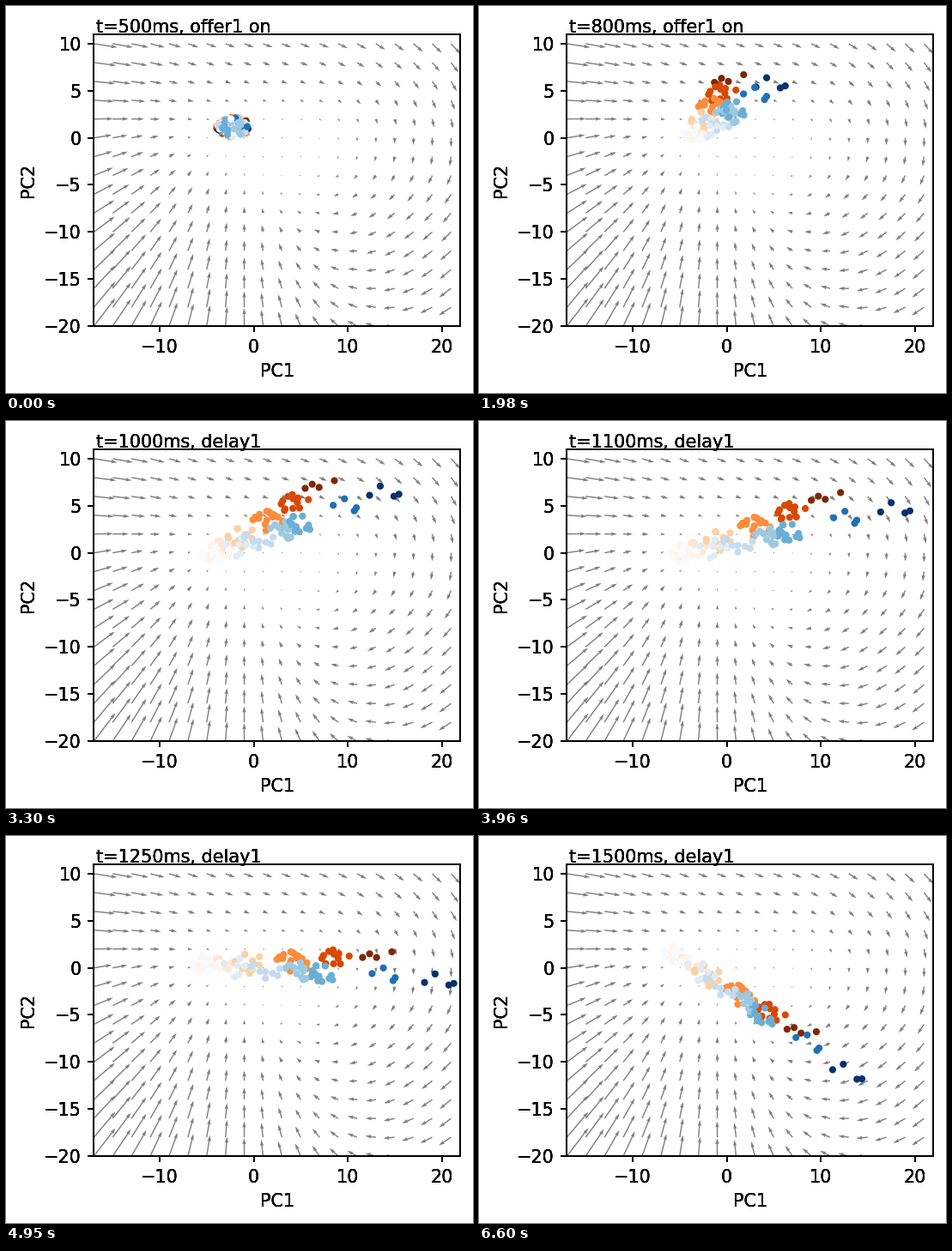
Animation of 544x451 px, one loop 7.92 s. Source, as a matplotlib script:

```python
import numpy as np
import matplotlib.pyplot as plt
from matplotlib.animation import FuncAnimation

W, H, DPI = 544, 451, 128
PT = 72 / DPI                      # points per pixel
STEPS, HOLD, INTERVAL = 21, 3, 330
RECT = [102.4 / W, 78 / H, 427 / W, 340 / H]
LAYERS = 4                         # repeated axes give the heavy lettering

# Path of the strongest trials in the plane; weaker ones follow part of the way.
LEAD_STEPS = np.array([0, 4, 8, 12, 15, 17, 20])
LEAD = np.array([(-2.2, 1.2), (1, 4.1), (9, 6.8), (17.9, 4.7),
                 (19.7, -1.3), (18.2, -5.7), (12.8, -11)])
SLOPES = np.gradient(LEAD, LEAD_STEPS, axis=0)
SLOPES[0] = 0

plt.rcParams.update({
    "font.family": "DejaVu Sans", "font.size": 20.83 * PT,
    "axes.linewidth": 1.67 * PT, "axes.labelpad": 8.33 * PT,
})
for axis in ("xtick", "ytick"):
    plt.rcParams.update({f"{axis}.major.width": 1.67 * PT,
                         f"{axis}.major.size": 7.3 * PT,
                         f"{axis}.major.pad": 7.3 * PT})


def smooth(step, a, b):
    u = np.clip((step - a) / (b - a), 0, 1)
    return u * u * (3 - 2 * u)


def softplus(z, width):
    return width * np.logaddexp(0, z / width)


def lead(step):
    """Cubic Hermite curve through the lead points."""
    i = min(np.searchsorted(LEAD_STEPS, step, side="right"), len(LEAD) - 1) - 1
    h = LEAD_STEPS[i + 1] - LEAD_STEPS[i]
    u = (step - LEAD_STEPS[i]) / h
    return ((2*u**3 - 3*u**2 + 1) * LEAD[i] + (u**3 - 2*u**2 + u) * h * SLOPES[i]
            + (3*u**2 - 2*u**3) * LEAD[i + 1] + (u**3 - u**2) * h * SLOPES[i + 1])


def rest(step):
    """Where trials of zero strength sit."""
    return np.array([-2.2 - 2.9 * smooth(step, 0, 18),
                     0.5 + 0.7 * np.cos(2 * np.pi * step / 22)])


class Family:
    """Trials of one colour map; darker means stronger."""

    def __init__(self, cmap, reach, bow, counts, rng):
        level = np.repeat(list(counts), list(counts.values()))
        level = rng.permutation(level)
        self.colors = plt.get_cmap(cmap)(level)
        self.q, self.bow = reach * level, bow
        angle = rng.uniform(0, 2 * np.pi, level.size)
        radius = np.sqrt(rng.uniform(0, 1, level.size))
        self.off = np.c_[1.8 * radius * np.cos(angle), 1.1 * radius * np.sin(angle)]

    def at(self, step):
        q = self.q[:, None]
        pos = rest(step) + q * (lead(step) - rest(step)) + self.off
        lag = np.sin(np.pi * min(step / 15, 1))
        lift = np.sin(np.pi * step / 23)
        pos += self.bow * q * [-lag, lift]
        pos[:, 1] -= 0.35 * smooth(step, 13, 20) * self.off[:, 0]
        return pos


rng = np.random.default_rng(8)
families = [
    Family("Oranges", 0.74, 3.2,
           {0: 12, .12: 6, .25: 12, .5: 20, .75: 12, 1: 4}, rng),
    Family("Blues", 1, 0,
           {0: 8, .12: 7, .25: 8, .38: 14, .5: 14, .75: 4, 1: 4}, rng),
]


def dots(step):
    return np.vstack([f.at(step) for f in families])


def flow(x, y):
    """Arrow field in pixels."""
    up, down = np.maximum(y, 0), np.maximum(-y - 1, 0)
    u = (1.9 * softplus(-x - 6 - 0.25 * up, 2) + 1.1 * up
         - (5.5 + 10 * np.tanh((x - 4) / 9)) * np.tanh(down / 9))
    edge = -1.8 - 0.42 * x - 0.011 * x**2
    v = ((1.1 - 0.022 * x) * softplus(edge - y, 1)
         - np.hypot(0.7 * softplus(x - 5, 2), 0.42 * up))
    return u, v


def add_axes(fig):
    ax = fig.add_axes(RECT, facecolor="none")
    ax.set(xlim=(-17, 22), ylim=(-20, 11), xlabel="PC1", ylabel="PC2",
           xticks=range(-10, 21, 10), yticks=range(-20, 11, 5))
    return ax


fig = plt.figure(figsize=(W / DPI, H / DPI), dpi=DPI, facecolor="white")
layers = [add_axes(fig) for _ in range(LAYERS)]
captions = [ax.text(-16.8, 11.2, "") for ax in layers]

gx, gy = np.meshgrid(np.arange(-17.0, 22, 2), np.arange(-20.0, 11, 2))
layers[0].quiver(gx, gy, *flow(gx, gy), color="gray", scale=1, scale_units="dots",
                 zorder=1)
trials = layers[0].scatter(*dots(0).T, s=(8.2 * PT) ** 2, linewidths=0, zorder=2,
                           c=np.vstack([f.colors for f in families]))


def update(frame):
    step = min(frame, STEPS - 1)
    t = 500 + 50 * step
    trials.set_offsets(dots(step))
    for caption in captions:
        caption.set_text(f"t={t}ms, {'offer1 on' if t < 1000 else 'delay1'}")
    return trials, *captions


anim = FuncAnimation(fig, update, frames=STEPS + HOLD, interval=INTERVAL,
                     repeat=True, repeat_delay=0, blit=False)
plt.show()
```
